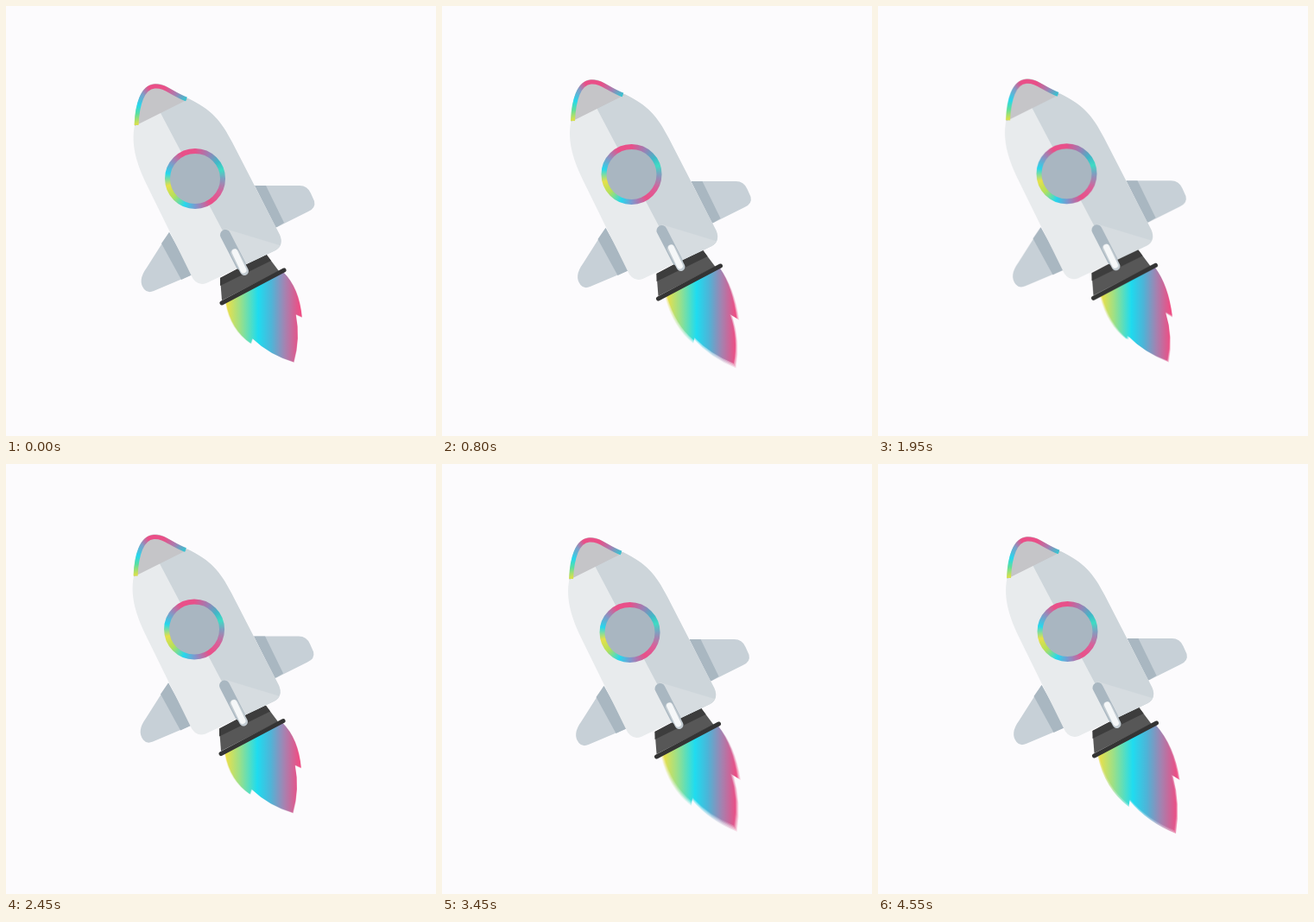
Animation of 498 by 498 pixels, one loop 4600 ms. Source, as an HTML page with a canvas:

```html
<!DOCTYPE html>
<html>
<head>
<meta charset="utf-8">
<style>
html, body { margin: 0; width: 100%; height: 100%; overflow: hidden; background: #fcfbfd; }
canvas { display: block; }
</style>
</head>
<body>
<canvas id="stage" width="498" height="498"></canvas>
<script>
const LOOP = 4600, STEP = 50, FLICKER = 612.5, SAMPLES = 5;
const out = document.getElementById('stage').getContext('2d');
const layer = document.createElement('canvas');
layer.width = layer.height = 498;
const ctx = layer.getContext('2d');

// Shake: time, x, y
const shake = [
  [0, 0, 0], [200, 2, -4], [400, -1, -6], [600, 2, -3], [800, .5, -5],
  [1000, -2, -4], [1200, 2, -7], [1400, -.5, -3.5], [1500, 6.5, -8.5],
  [1700, 1, -4], [1900, -1, -6], [2100, 2, -4], [2300, 1, -6],
  [2450, -1, -8.5], [2650, 2, -5], [2850, -1, -3], [3050, 2, -7],
  [3250, 1, -4], [3450, -1.5, -5], [3700, 2, -7], [3900, -1, -3],
  [4150, .5, -4.5], [4350, 2, -7], [4550, .5, -6], [4600, .5, -6]
];

// Flame outlines: start, then left edge, left notch, tip, right notch, right edge
const wide = [254,344, 259,375, 283,391, 285,385, 305,404, 333,412, 341,385, 336,357, 343,360, 340,326, 321,308];
const slim = [260,341, 270,375, 291,392, 292,389, 310,408, 337.5,419, 343,390, 333,362, 341,367, 336,330, 321,308];
const long = [254,344, 262,382, 290,403, 291,396, 312,421, 344.5,434, 350,400, 341,367, 349,372, 343,332, 321,308];

const rainbow = ['#f3df45', '#9be08a', '#1fdcf0', '#4fb5d8', '#a484b2', '#ee4f85'];
const clamp = v => Math.max(0, Math.min(1, v));
const mix = (a, b, k) => a + (b - a) * k;

function fill(d, color) {
  ctx.fillStyle = color;
  ctx.fill(new Path2D(d));
}

function line(d, color, width, cap = 'round') {
  ctx.strokeStyle = color;
  ctx.lineWidth = width;
  ctx.lineCap = cap;
  ctx.stroke(new Path2D(d));
}

function addStops(gradient, stops) {
  for (const [at, color] of stops) gradient.addColorStop(at, color);
  return gradient;
}

const ringPaint = addStops(ctx.createConicGradient(0, 219, 200), [
  [0, '#7f9fc0'], [.08, '#d9609a'], [.16, '#ea4f88'], [.25, '#7a9ad0'],
  [.31, '#25d8ee'], [.39, '#b4e05c'], [.46, '#e6e04a'], [.53, '#25d8ee'],
  [.6, '#8a93c2'], [.67, '#ea4f88'], [.75, '#e8508a'], [.83, '#9a80b5'],
  [.9, '#40b8c8'], [.95, '#3fdcc4'], [1, '#7f9fc0']
]);
const nosePaint = addStops(ctx.createConicGradient(Math.PI / 2, 180, 125), [
  [0, '#e6e04a'], [.19, '#d5e04e'], [.25, '#5cdfa0'], [.31, '#25d8ee'],
  [.38, '#7f9fc8'], [.43, '#ea4f88'], [.52, '#ea4f88'],
  [.6, '#a57fb2'], [.67, '#30c8d4'], [1, '#30c8d4']
]);

function shakeAt(t) {
  const i = Math.max(1, shake.findIndex(key => key[0] > t));
  const a = shake[i - 1], b = shake[i];
  const k = clamp((t - a[0]) / (b[0] - a[0])), ease = k * k * (3 - 2 * k);
  return [mix(a[1], b[1], ease), mix(a[2], b[2], ease)];
}

function drawFlame(t) {
  const phase = t / FLICKER, d = Math.abs(phase - Math.round(phase));
  const narrow = clamp(d / .24), stretch = clamp((d - .29) / .14);
  const p = wide.map((v, i) => mix(mix(v, slim[i], narrow), long[i], stretch));
  const paint = ctx.createLinearGradient(p[0], 0, p[16] - 3, 0);
  addStops(paint, rainbow.map((c, i) => [[0, .2, .44, .62, .8, 1][i], c]));
  fill(`M${p.slice(0, 2)}Q${p.slice(2, 6)}L${p.slice(6, 8)}Q${p.slice(8, 12)}` +
    `Q${p.slice(12, 16)}L${p.slice(16, 18)}Q${p.slice(18)}Z`, paint);
}

function drawRocket() {
  // Fins
  fill('M189 262L163 303Q152 318 160 328Q164 333 171 330L216 311Z', '#c7d0d7');
  fill('M189 262L180 275L203 317L216 311Z', '#a9b7c1');
  fill('M288 208H340Q349 208 353 217L357 226Q359 234 350 238L314 256Z', '#c7d0d7');
  fill('M288 208H301L322 251L312 257Z', '#a9b7c1');

  // Nozzle
  fill('M248 315L301 287L316 307L250 341Z', '#575757');
  fill('M248 315L301 287L307 295L248 324Z', '#3d3d3d');
  line('M250 344L322 306', '#343434', 5);

  // Hull
  const hull = new Path2D('M149 138C144 163 153 186 163 207L214 311Q220 325 232 321' +
    'L312 283Q322 277 317 265L262 158C249 133 238 120 211 107Z');
  ctx.fillStyle = '#e8ebed';
  ctx.fill(hull);
  ctx.save();
  ctx.clip(hull);
  fill('M178 122L275 306L340 290L300 140L211 100Z', '#cdd5da');
  fill('M254 258L320 278L275 306Z', '#d6dce0');
  ctx.restore();

  // Nose
  fill('M149 139C150 112 156 92 172 90C184 89 192 98 211 108Z', '#c5c5c8');
  line('M151 138C152 114 158 94 172 93C184 92 191 101 209 108', nosePaint, 5, 'butt');

  // Window
  ctx.beginPath();
  ctx.arc(219, 200, 32, 0, 2 * Math.PI);
  ctx.fillStyle = '#a9b6c1';
  ctx.fill();
  ctx.strokeStyle = ringPaint;
  ctx.lineWidth = 6;
  ctx.stroke();

  // Centre fin
  line('M254 265L272 300', '#a9b7c1', 12);
  line('M265 286L276 307', '#c3ccd2', 10);
  line('M265 285L275 306', '#f5f7f8', 7);
}

function drawScene(t) {
  ctx.fillStyle = '#fcfbfd';
  ctx.fillRect(0, 0, 498, 498);
  ctx.save();
  ctx.translate(...shakeAt(t));
  drawFlame(t);
  drawRocket();
  ctx.restore();
}

function render(now) {
  const t = Math.floor(now % LOOP / STEP) * STEP;
  // Average several moments for motion blur
  for (let i = 0; i < SAMPLES; i++) {
    drawScene(t + ((i + .5) / SAMPLES - .5) * STEP);
    out.globalAlpha = 1 / (i + 1);
    out.drawImage(layer, 0, 0);
  }
}

const start = performance.now();
function tick() {
  render(performance.now() - start);
  requestAnimationFrame(tick);
}
tick();
</script>
</body>
</html>
```
